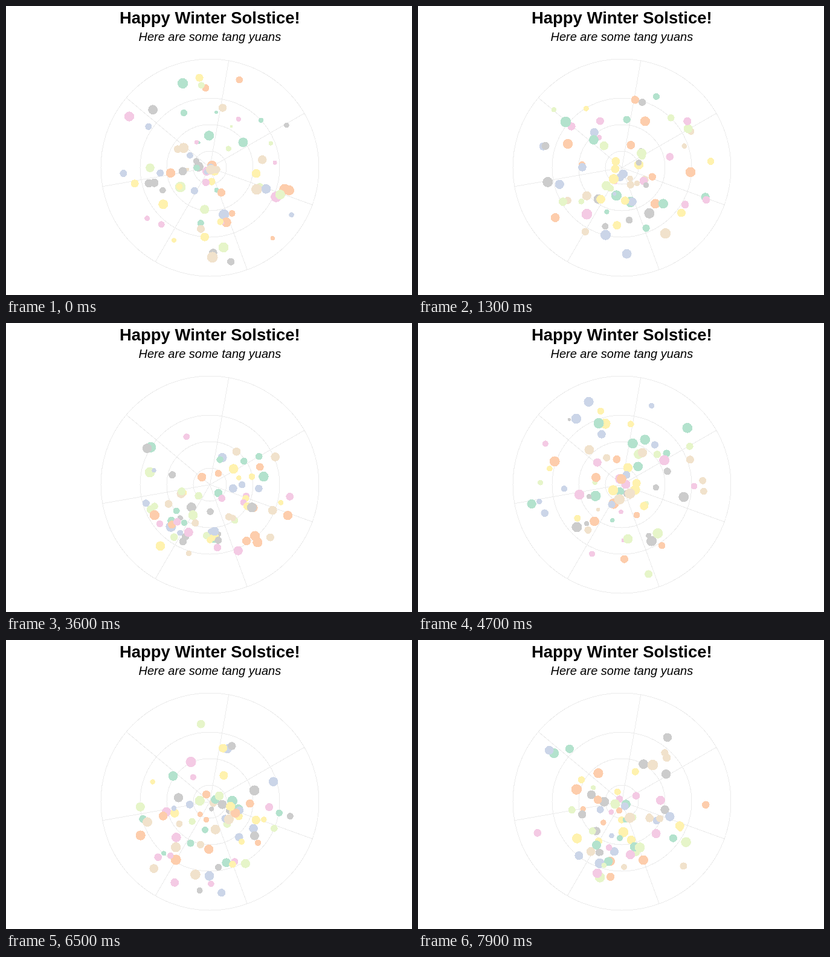
An HTML page for the animation above (8000 ms loop, 672 by 480 pixels).

```html
<!DOCTYPE html>
<html lang="en">
<head>
<meta charset="utf-8">
<title>Happy Winter Solstice!</title>
<style>
html, body { margin: 0; width: 100%; height: 100%; overflow: hidden; background: #fff; }
svg { display: block; }
text { font-family: "Liberation Sans", Arial, sans-serif; text-anchor: middle; }
.title { font-size: 27.45px; font-weight: bold; }
.subtitle { font-size: 20px; font-style: italic; }
.grid { fill: none; stroke: #ebebeb; }
.grid, .dots { shape-rendering: crispEdges; }
</style>
</head>
<body>
<svg width="672" height="480" viewBox="0 0 672 480">
  <text class="title" x="337.3" y="29">Happy Winter Solstice!</text>
  <text class="subtitle" x="337.3" y="58">Here are some tang yuans</text>
  <g class="grid" transform="translate(337.5 268.5)"></g>
  <g class="dots" transform="translate(337.5 268.5)"></g>
</svg>
<script>
const LOOP = 8000, STEP = 100, STATE = 425;
const DOTS = 80, REACH = 160, RIM = 180.5;
const COLORS = ['#b3e2cd', '#fdcdac', '#cbd5e8', '#f4cae4',
                '#e6f5c9', '#fff2ae', '#f1e2cc', '#cccccc'];

let seed = 1221;
function random() {
  seed = (seed + 0x6d2b79f5) | 0;
  let v = Math.imul(seed ^ (seed >>> 15), 1 | seed);
  v = (v + Math.imul(v ^ (v >>> 7), 61 | v)) ^ v;
  return ((v ^ (v >>> 14)) >>> 0) / 4294967296;
}

function add(parent, tag, attrs) {
  const node = document.createElementNS('http://www.w3.org/2000/svg', tag);
  for (const key in attrs) node.setAttribute(key, attrs[key]);
  return parent.appendChild(node);
}

const grid = document.querySelector('.grid');
for (const r of [27.5, 71.5, 115.5, RIM]) add(grid, 'circle', { r });
for (let deg = 10; deg < 360; deg += 50) {
  add(grid, 'path', { d: `M0 0V${-RIM}`, transform: `rotate(${deg})` });
}

// Angles run clockwise from the top; dots never cross that seam
const randomPose = () => ({
  angle: random() * 2 * Math.PI,
  dist: random() * REACH,
  size: 1.9 + 7.1 * Math.sqrt(random())
});

const layer = document.querySelector('.dots');
const stateCount = Math.ceil(LOOP / STATE) + 1;
const dots = Array.from({ length: DOTS }, (_, i) => ({
  node: add(layer, 'circle', { fill: COLORS[i % COLORS.length] }),
  poses: Array.from({ length: stateCount }, randomPose)
}));

function draw(time) {
  const phase = Math.floor((time % LOOP) / STEP) * STEP / STATE;
  const index = Math.floor(phase), k = phase - index;
  for (const { node, poses } of dots) {
    const from = poses[index], to = poses[index + 1];
    const mix = key => from[key] + (to[key] - from[key]) * k;
    const angle = mix('angle'), dist = mix('dist');
    node.setAttribute('cx', dist * Math.sin(angle));
    node.setAttribute('cy', -dist * Math.cos(angle));
    node.setAttribute('r', mix('size'));
  }
}

const start = performance.now();
function tick() {
  draw(performance.now() - start);
  requestAnimationFrame(tick);
}
tick();
</script>
</body>
</html>
```
